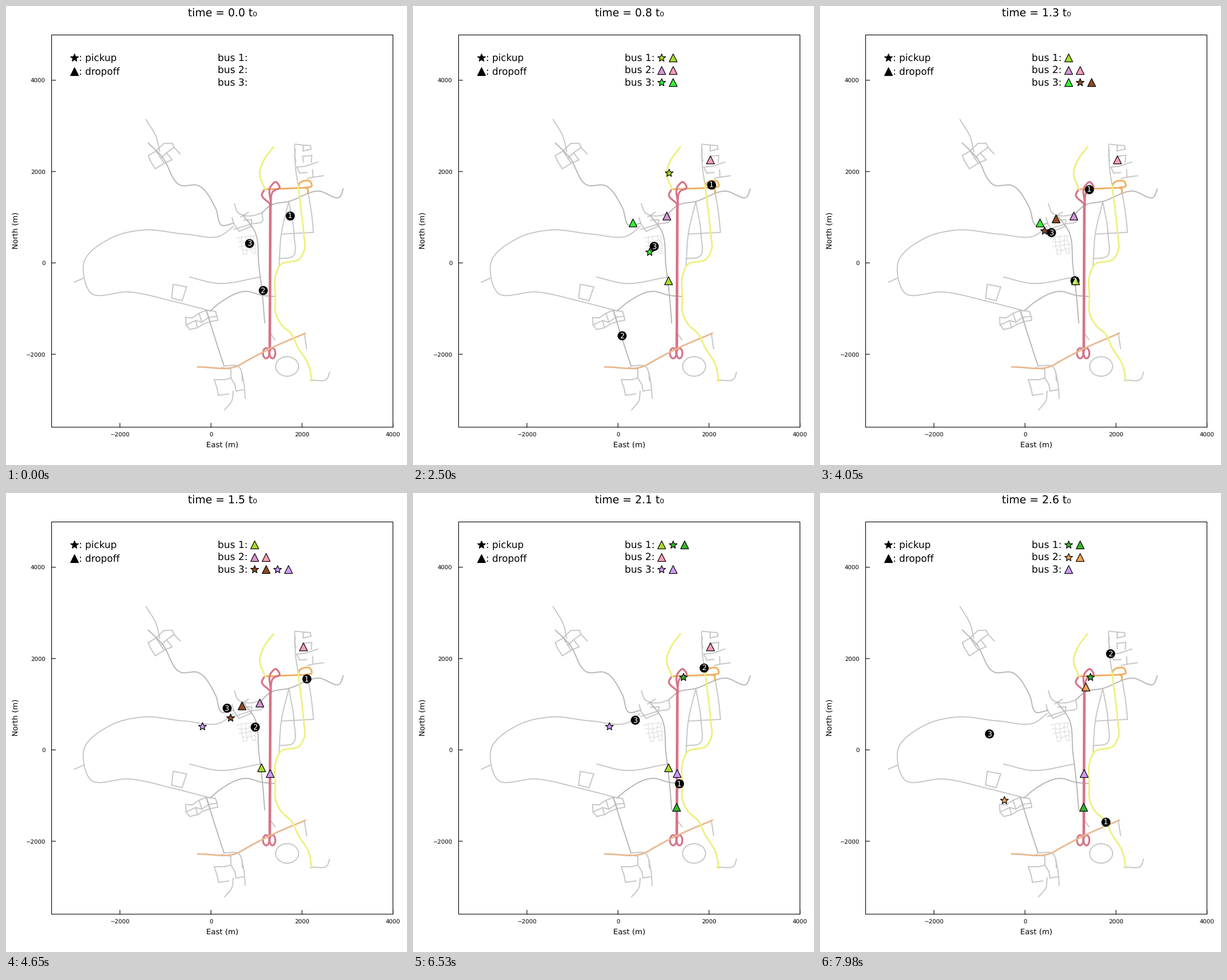
Recreate the animation shown at these times as a matplotlib script. Size 699 px wide and 801 px high, loop 8 s.

```python
import numpy as np
import matplotlib.pyplot as plt
from matplotlib.animation import FuncAnimation
from matplotlib.collections import LineCollection

W, H, DPI = 699, 801, 100
PT = 72 / DPI            # points per pixel
STEP, LOOP = 25, 8000    # ms

plt.rcParams["font.family"] = "DejaVu Sans"
plt.rcParams["text.hinting"] = "none"
rng = np.random.default_rng(4)
fig = plt.figure(figsize=(W / DPI, H / DPI), dpi=DPI, facecolor="white")
ax = fig.add_axes([0, 0, 1, 1])
ax.set_xlim(0, W)
ax.set_ylim(H, 0)
ax.axis("off")


def label(x, y, s, px, **kw):
    kw.setdefault("va", "baseline")
    return ax.text(x, y, s, fontsize=px * PT, **kw)


def draw_lines(lines, color, width, z):
    ax.add_collection(LineCollection(
        lines, colors=color, linewidths=width * PT, zorder=z,
        capstyle="round", joinstyle="round", snap=False), autolim=False)


def travelled(p):
    return np.r_[0, np.cumsum(np.hypot(*np.diff(p, axis=0).T))]


def curve(*pts):
    """Smooth cubic curve through a few key points."""
    p = np.array(pts, float)
    s = travelled(p)
    m = np.gradient(p, s, axis=0)
    u = np.linspace(0, s[-1], 12 * len(p))
    k = np.clip(np.searchsorted(s, u, "right") - 1, 0, len(p) - 2)
    h = (s[k + 1] - s[k])[:, None]
    t = (u - s[k])[:, None] / h
    return ((1 + 2 * t) * (1 - t)**2 * p[k] + t * (1 - t)**2 * h * m[k]
            + t**2 * (3 - 2 * t) * p[k + 1] + t**2 * (t - 1) * h * m[k + 1])


def ring(cx, cy, rx, ry):
    a = np.linspace(0, 2 * np.pi, 40)
    return np.c_[cx + rx * np.cos(a), cy + ry * np.sin(a)]


def streets(cx, cy, w, h, tilt, nx, ny, keep=0.7, jitter=2.0):
    """Tilted, slightly irregular street grid with some links left out."""
    gx, gy = np.meshgrid(np.linspace(-w / 2, w / 2, nx), np.linspace(-h / 2, h / 2, ny))
    wobble = rng.normal(0, jitter, (2, ny, nx))
    z = (gx + 1j * gy + wobble[0] + 1j * wobble[1]) * np.exp(1j * np.radians(tilt))
    z += cx + 1j * cy
    links = [*zip(z[:, :-1].flat, z[:, 1:].flat), *zip(z[:-1].flat, z[1:].flat)]
    return [[(a.real, a.imag), (b.real, b.imag)] for a, b in links if rng.random() < keep]


# Junctions and stops shared by roads, routes and markers
PLACES = dict(
    depot=(494.5, 365.5), lane=(493, 341), cross=(512, 334), ramp=(509, 312),
    bend=(533, 311), hook=(525, 318), quay=(451, 320), elbow=(519, 435),
    plain=(478, 452), fork=(469.5, 507), gate=(447, 505), dale=(471, 541),
    mid=(419, 498), village=(356, 532), corner=(433, 392), square=(413, 365),
    spur=(461, 348), pike=(504, 266), yard=(398, 388),
    lime1=(446, 291), lime2=(445, 479), green1=(471, 321), green2=(459, 548),
    rose1=(450, 518), rose2=(517.5, 268), plum1=(366, 585), plum2=(442, 366),
    amber1=(321, 535.5), amber2=(463, 338), neon1=(412, 429), neon2=(383, 377.5),
    brown1=(391, 391.5), brown2=(410.5, 371), lilac1=(342, 407), lilac2=(460, 488.5),
)


def at(place):
    return PLACES[place] if isinstance(place, str) else place


def path(*places):
    return curve(*map(at, places))


# ---- map ----
trunk = [
    path((248, 239), (272, 263), (305, 313), (334, 313), (365, 352), (377, 383), (397, 379)),
    path("village", (374, 517), "mid", "gate", "fork"),
    path("square", "corner", (441, 455), "gate", (451, 553)),
    path((349, 531), "plum1", (380, 628)),
    path((446, 361), "spur", "lane", (545, 323), (582, 333), (588, 319)),
]
minor = [
    path((396, 385), (376, 400), (312, 398), (238, 391), (185, 404), (136, 447),
         (148, 501), (215, 499), (290, 515), "village"),
    path((244, 198), (262, 229), (268, 254)),
    path((119, 482), (135, 475)),
    path((320, 473), (368, 484), (444, 473)),
    path((398, 345), (405, 361), "square", (430, 366), (446, 361)),
    path((397, 390), (430, 380), (447, 376), (446, 361)),
    path("lane", (480, 397), (476, 452)),
    path((476, 441), (500, 437), (502, 398), "lane"),
    path((527, 327), (533, 365), (536, 395)),
    [(480, 398), (536, 395)],
    path((503, 243), (505, 285), "ramp"),
    path((520, 571), (524, 598)),
    path((530, 653), (560, 650), (564, 639)),
    path((417, 685), (414, 655), (405, 629), (380, 628)),
    path((381, 705), (394, 688), (396, 672)),
    ring(490, 629, 20, 17),
]
minor += streets(275, 260, 44, 28, -32, 4, 3)                # north-west village
minor += streets(300, 501, 22, 24, 12, 2, 2, 1)              # south-west hamlet
minor += streets(341, 548, 52, 22, -18, 5, 3)
minor += streets(388, 653, 46, 42, -14, 4, 4)                # southern village
minor += streets(413, 376, 32, 24, -20, 3, 3, 0.6)           # centre
minor += streets(518, 257, 28, 30, 0, 3, 4, 0.75, 1)         # north-east town
minor += streets(529, 287, 40, 22, -14, 4, 3)
minor += streets(480, 571, 32, 18, -20, 3, 2)
estate = streets(419, 418, 30, 30, -8, 5, 5, 0.85, 1)

pink = [
    [(460.8, 345), (459.8, 600)],
    path("quay", (446, 329), (460, 345)),
    path((462, 348), (462, 314), (470, 307), (477, 317), (466, 323), (461, 348)),
    ring(453.5, 606, 5.5, 9), ring(464.5, 606, 5, 9),
]
orange = [
    [at("quay"), (526, 317)],
    path((509, 317), (512, 309), (531, 307), (533, 314), (522, 317)),
    path((522, 317), (526, 320), (526, 327)),
]
yellow = [
    path((466, 246), (449, 270), (442, 291), (452, 321)),
    path("ramp", (519.5, 403), (521, 422), (512, 441), "plain", (470, 470), "fork",
         (470.5, 538), (480, 556), (498, 573), (508, 594), (528, 628), (533, 655)),
]
salmon = [path((334, 630), (404, 628), (420, 619), (460, 598), (522, 571))]

draw_lines(estate, "#dedede", 1.2, 1)
draw_lines(minor, "#c6c6c6", 1.9, 1)
draw_lines(trunk, "#b6b6b6", 1.9, 1)
draw_lines(orange, "#efb062", 3, 2)
draw_lines(pink[1:], "#d67488", 3.2, 3)
draw_lines(pink[:1], "#d67488", 4.6, 3)
draw_lines(salmon, "#e8b990", 2.8, 3.2)
draw_lines(yellow, "#edf07c", 2.8, 3.5)

# ---- axes and labels ----
L, R, T, B = 79.5, 674.5, 50.5, 735
frame = [[(L, T), (R, T), (R, B), (L, B), (L, T)]]
for k in range(-1, 3):
    x, y = 357.3 + 158.7 * k, 448.3 - 159.4 * k
    name = str(2000 * k).replace("-", "\u2212")
    frame += [[(x, B), (x, B - 7)], [(L, y), (L + 7, y)]]
    label(x, 750.8, name, 10.1, ha="center")
    label(68.7, y + 3.8, name, 10.1, ha="right")
draw_lines(frame, "black", 1.1, 4)
label(377, 770.5, "East (m)", 13.3, ha="center")
label(17.8, 392, "North (m)", 13.3, ha="center", va="center", rotation=90)

title = label(377, 17.6, "", 18.8, ha="center")
label(126.8, 96, ": pickup", 16.7)
label(126.8, 120, ": dropoff", 16.7)
ROWS = (90, 111.5, 133)
for k, y in enumerate(ROWS):
    label(368.7, y + 6.3, f"bus {k + 1}:", 17)


# ---- buses ----
def route(start, place, *legs):
    """Each leg is (arrival ms, places on the way, end); speed is even within a leg."""
    ms, pts, arrivals = [start], [at(place)], {}
    for end_ms, via, end in legs:
        leg = np.array([pts[-1], *map(at, via.split()), at(end)])
        s = travelled(leg)
        ms += list(ms[-1] + (end_ms - ms[-1]) * s[1:] / s[-1])
        pts += [tuple(p) for p in leg[1:]]
        arrivals[end] = end_ms
    return np.array(ms), np.array(pts), arrivals


ROUTES = [
    route(1830, "depot",
          (3430, "lane cross ramp bend hook quay", (446, 311.5)), (3600, "", "lime1"),
          (4650, "quay hook", (524, 324)), (5450, "cross", (519.5, 411)),
          (6530, "elbow plain fork", (463, 507)), (6870, "gate", "lime2"),
          (7980, "gate fork dale", (498, 574))),
    route(450, (447.5, 496),
          (720, "", "rose1"), (1500, "gate mid", (389, 511.5)),
          (2400, "village", "plum1"), (3430, "village", (401.5, 506)),
          (4650, "mid gate", (434, 408)), (5450, "corner square", (443, 364)),
          (5475, "", "plum2"), (6530, "spur cross ramp", (507, 304)),
          (7350, "pike", "rose2"), (7980, "pike", (506, 280.5))),
    route(2250, (424, 413.5),
          (2950, "", "neon1"), (3430, "", (420.5, 419)), (4625, "yard", "neon2"),
          (4650, "", (384.5, 375)), (5475, "", "brown1"), (5950, "yard", "brown2"),
          (6530, "yard", (386.5, 396)), (7220, "", "lilac1"), (7980, "", (294.5, 420))),
]

# ---- requests ----
COLORS = dict(lime="#a8dc2c", green="#36b52c", rose="#ff9fb3", plum="#d596d8",
              amber="#f2a452", neon="#35ef3a", brown="#8f4b20", lilac="#cf9bfb")
# per bus: colour and time of request
REQUESTS = [dict(lime=1830, green=5900), dict(rose=450, plum=950, amber=7450),
            dict(neon=2200, brown=3200, lilac=4100)]


def mark(kind, color, pos=(0, 0)):
    return ax.plot(*[[c] for c in pos], kind, ms=(15 if kind == "*" else 14.6) * PT,
                   mfc=color, mec="black", mew=1.2 * PT, zorder=5.5)[0]


mark("*", "black", (119, 90))
mark("^", "black", (119, 114))

# each stop: bus, shown from, served at, map marker, list marker
stops = []
for bus, wishes in enumerate(REQUESTS):
    for name, asked in wishes.items():
        for kind, place in (("*", name + "1"), ("^", name + "2")):
            served = ROUTES[bus][2].get(place, np.inf)
            stops.append((bus, asked, served, mark(kind, COLORS[name], at(place)),
                          mark(kind, COLORS[name])))
stops.sort(key=lambda s: s[2])

discs = [ax.plot([0], [0], "o", ms=15.8 * PT, color="black", mew=0, zorder=5)[0]
         for _ in ROUTES]
digits = [label(0, 0, str(k + 1), 13, color="white", ha="center", zorder=6)
          for k in range(len(ROUTES))]


def draw(i):
    t = i * STEP
    title.set_text(f"time = {t * 0.328e-3 + 0.0024 + 1e-9:.1f} t\u2080")
    used = [0, 0, 0]
    for bus, asked, served, spot, icon in stops:
        shown = asked <= t < served
        spot.set_visible(shown)
        icon.set_visible(shown)
        if shown:
            icon.set_data([433 + 19.8 * used[bus]], [ROWS[bus]])
            used[bus] += 1
    for disc, digit, (ms, pts, _) in zip(discs, digits, ROUTES):
        x, y = (np.interp(t, ms, c) for c in pts.T)
        disc.set_data([x], [y])
        digit.set_position((x, y + 4.7))
    return [title, *discs, *digits]


anim = FuncAnimation(fig, draw, frames=LOOP // STEP, interval=STEP,
                     repeat=True, repeat_delay=0, blit=False)
plt.show()
```
